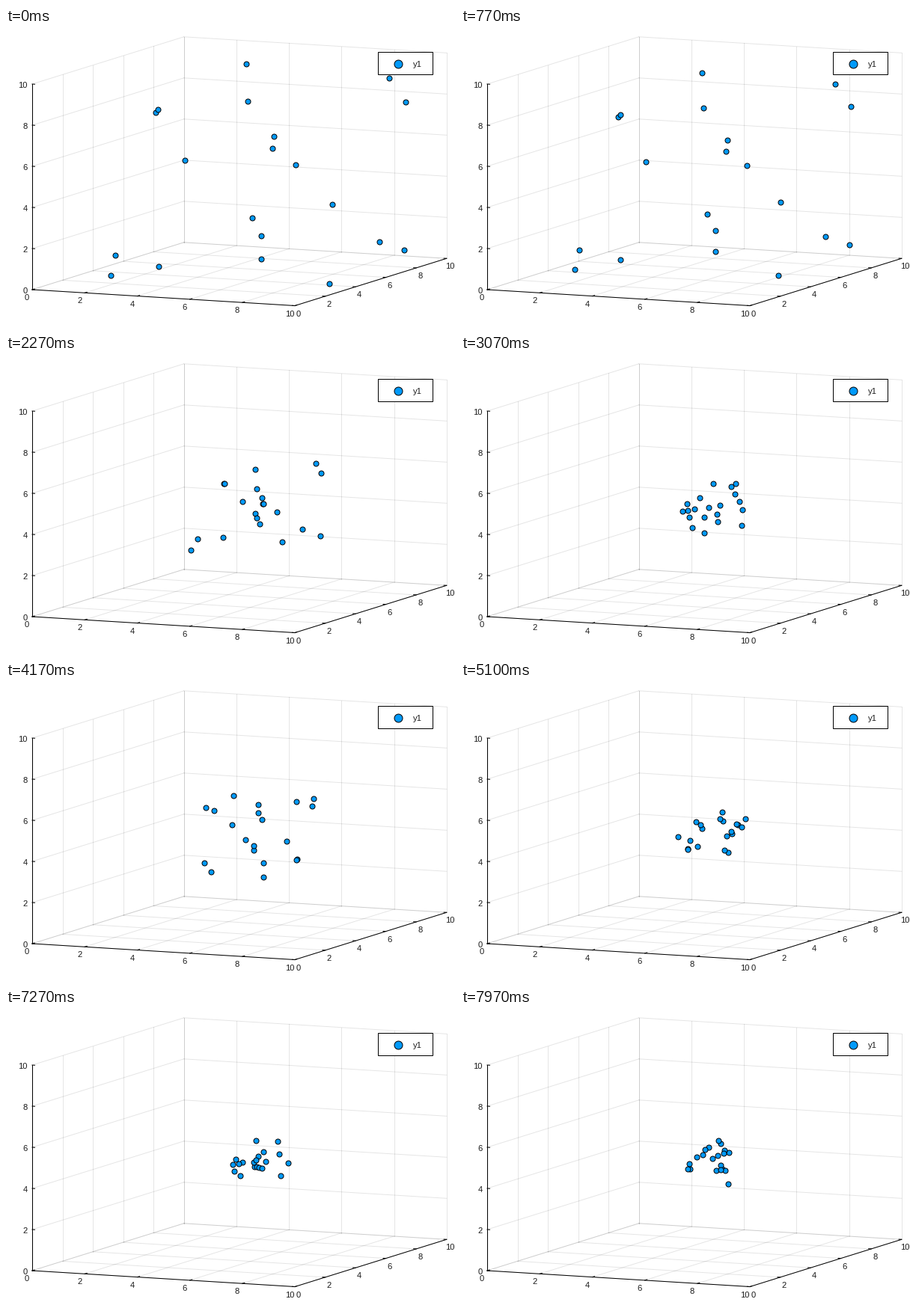
A matplotlib script that plays this animation: 600x400 px, repeating every 8000 ms.

```python
import numpy as np
import matplotlib.pyplot as plt
from matplotlib.animation import FuncAnimation
from matplotlib.patches import Rectangle

W, H, DPI = 600, 400, 100
FPS, FRAMES = 30, 240
PX = 72 / DPI
BLUE = "#009AFA"
CENTRE = np.array([338.0, 203.0])
MEET, TURN = 2.4, 4.17  # seconds: end of free fall, far turning point

# Where the dots rest before they fall together.
REST = np.array([
    (320, 47), (511, 66), (533, 98), (322, 97), (199, 112),
    (202, 108), (357, 144), (355, 160), (238, 176), (386, 182),
    (435, 235), (328, 253), (340, 277), (340, 308), (498, 285),
    (531, 296), (145, 303), (139, 330), (203, 318), (431, 341)]) + 0.5

# Each dot is pulled to the centre, falls through and swings on the far side.
offset = REST - CENTRE
dist = np.hypot(*offset.T)[:, None]
pull = -28.5 * np.tanh(dist / 170) * offset / dist
swing = -0.37 * offset
rate = 2.2 - 0.003 * dist

# Sideways drift keeps the swarm from collapsing to a point.
rng = np.random.default_rng(4)
angle = rng.uniform(0, 2 * np.pi, len(REST))
width = rng.uniform(18, 42, len(REST))
side = np.c_[width * np.cos(angle), 0.85 * width * np.sin(angle)]


def smooth(u):
    u = np.clip(u, 0, 1)
    return u * u * (3 - 2 * u)


def infall(t):
    return REST + pull * t ** 2


def cross(t):
    """Cubic path through the middle to a stop at the turning point."""
    span = TURN - MEET
    u = (t - MEET) / span
    return (infall(MEET) * (1 - smooth(u))
            + 2 * pull * MEET * span * u * (1 - u) ** 2
            + (CENTRE + swing) * smooth(u))


def orbit(t):
    """Damped swings about the centre."""
    s = t - TURN
    return CENTRE + swing * np.cos(rate * s) / (1 + 0.2 * s * s)


def positions(t):
    path = infall if t < MEET else cross if t < TURN else orbit
    return path(t) + side * smooth((t - 2) / 1.1) * np.sin(rate * (t - TURN))


def project(x, y, z):
    return np.array([35 + 35.1 * x + 20.27 * y,
                     350 + 2.15 * x - 6.32 * y - 27.5 * z])


plt.rcParams["font.family"] = "Liberation Sans"
fig = plt.figure(figsize=(W / DPI, H / DPI), dpi=DPI, facecolor="white")
ax = fig.add_axes([0, 0, 1, 1])
ax.set_xlim(0, W)
ax.set_ylim(H, 0)
ax.axis("off")


def line(a, b, **style):
    ax.plot(*zip(project(*a), project(*b)), lw=PX, color="black", **style)


def grid(a, b):
    line(a, b, alpha=0.1, zorder=1)


def axis(a, b):
    line(a, b, zorder=2)


def label(pos, text, ha="center", **style):
    ax.text(*pos, text, ha=ha, va="center_baseline", fontsize=8,
            color="#1a1a1a", **style)


for k in range(0, 11, 2):
    grid((k, 0, 0), (k, 10, 0))
    grid((k, 10, 0), (k, 10, 10))
    grid((0, k, 0), (10, k, 0))
    grid((0, k, 0), (0, k, 10))
    grid((0, 0, k), (0, 10, k))
    grid((0, 10, k), (10, 10, k))
    axis((k, 0, 0), (k, 0.15, 0))
    axis((10, k, 0), (9.9, k, 0))
    axis((0, 0, k), (0.1, 0, k))
    label(project(k, 0, 0) + (-7, 10), k)
    label(project(10, k, 0) + (5, 10), k)
    label(project(0, 0, k) + (-6.5, 1), k, ha="right")

axis((0, 0, 0), (10, 0, 0))
axis((10, 0, 0), (10, 10, 0))
axis((0, 0, 0), (0, 0, 10))


def dots(xy, size, **style):
    return ax.scatter(*np.transpose(xy), s=(size * PX) ** 2, c=BLUE,
                      edgecolors="black", linewidths=PX, **style)


cloud = dots(REST, 7, zorder=4)
ax.add_patch(Rectangle((497, 32), 73, 30, fc="white", ec="black",
                       lw=PX, zorder=5))
dots([(524.3, 47.5)], 11, zorder=6)
label((550, 48), "y1", zorder=6)


def draw(i):
    cloud.set_offsets(positions(i / FPS))
    return cloud,


anim = FuncAnimation(fig, draw, frames=FRAMES, interval=1000 / FPS,
                     repeat=True, repeat_delay=0)
plt.show()
```
